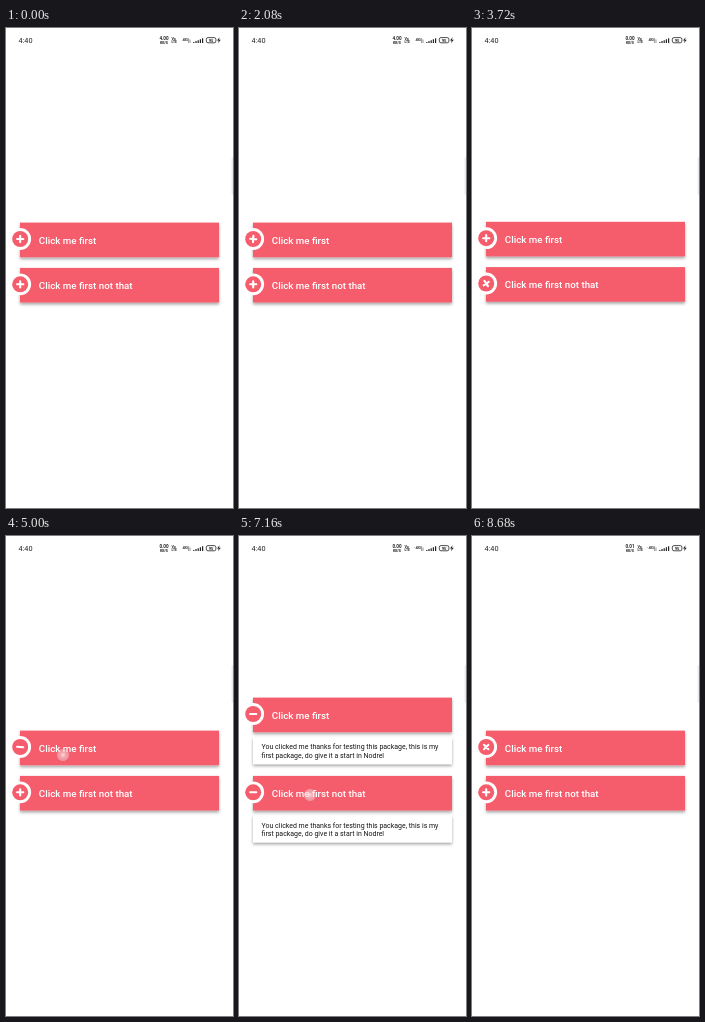
An HTML page for the animation above (8720 ms loop, 227x480 px).

```html
<!DOCTYPE html>
<html lang="en">
<head>
<meta charset="utf-8">
<title>Accordion cards</title>
<style>
html, body { margin: 0; width: 100%; height: 100%; overflow: hidden; background: #fff; }
svg { display: block; width: 100vw; height: 100vh; font-family: Roboto, sans-serif; }
.title { font-weight: 500; font-size: 9.75px; fill: #fff; }
.body { font-size: 6.97px; fill: #151515; }
.tiny { font-weight: 700; font-size: 4.2px; fill: #222; }
</style>
</head>
<body>
<svg viewBox="0 0 227 480">
  <defs>
    <filter id="shade" x="-10%" y="-40%" width="120%" height="190%">
      <feDropShadow dx="0" dy="1.9" stdDeviation="1.5" flood-color="#000" flood-opacity=".36"/>
    </filter>
    <radialGradient id="glow">
      <stop offset="0" stop-color="#fff" stop-opacity=".75"/>
      <stop offset=".45" stop-color="#f6dfe2" stop-opacity=".55"/>
      <stop offset=".9" stop-color="#e8d4d8" stop-opacity=".42"/>
      <stop offset="1" stop-color="#e8d4d8" stop-opacity="0"/>
    </radialGradient>
  </defs>
  <rect width="227" height="480" fill="#fff"/>
  <rect x="225.6" y="129" width="3" height="38" rx="1" fill="#e9e9e9"/>

  <g id="status">
    <text x="12.5" y="15" font-size="7.3" fill="#222">4:40</text>
    <g class="tiny">
      <text id="speed" x="158" y="11.9" text-anchor="middle" font-size="4.6"></text>
      <text x="158" y="15.6" text-anchor="middle" style="font-size:3.6px">KB/S</text>
      <text x="165.5" y="12" style="font-size:3.6px">Vo</text>
      <text x="165.5" y="15.1" style="font-size:3.4px">LTE</text>
      <text x="176.5" y="13.4">4G</text>
      <text id="arrow" x="174.4" y="12.6">·</text>
    </g>
    <path d="M182.6 15V10.2M184 15V11.5" stroke="#555" stroke-width=".6"/>
    <path d="M187.8 15v-1.1M190 15v-1.9M192.2 15v-2.8M194.4 15v-3.7M196.6 15v-4.8" stroke="#222" stroke-width="1.2"/>
    <rect x="200.3" y="9.6" width="9.6" height="5.2" rx="1.7" fill="none" stroke="#222" stroke-width=".8"/>
    <text class="tiny" x="205.1" y="13.8" text-anchor="middle">95</text>
    <path d="M213.6 9.2l-2.6 3.3h1.7l-.7 2.8 2.8-3.5h-1.8z" fill="#222"/>
  </g>

  <g id="cards"></g>
  <circle id="touch" r="6.4" fill="url(#glow)"/>
</svg>
<script>
const LOOP = 8720, OPEN_MS = 490, CLOSE_MS = 390, HOLD = 180;
const SPIN_OPEN = 600, SPIN_CLOSE = 1040;
const TOP = 194.6, HEAD = 34.6, PITCH = 45.3, EXTRA = 33;

// release time, card, opens?, finger x, finger y
const taps = [
  [220, 0, 1, 57, 213],
  [1540, 0, 0, 58, 200],
  [2460, 1, 1, 70, 262],
  [3400, 1, 0, 72, 245],
  [4990, 0, 1, 57, 219],
  [6010, 1, 1, 71.5, 272],
  [7320, 1, 0, 71, 259],
  [7900, 0, 0, 60, 190]
];

const $ = id => document.getElementById(id);
const clamp = v => Math.max(0, Math.min(1, v));
const ease = v => v < .5 ? 4 * v ** 3 : 1 - 4 * (1 - v) ** 3;
const put = (el, attrs) => { for (const k in attrs) el.setAttribute(k, attrs[k]); };

const cardMarkup = (title, i) => `
  <g id="card${i}">
    <clipPath id="clip${i}"><rect id="reveal${i}" y="${HEAD}" width="227"/></clipPath>
    <g clip-path="url(#clip${i})">
      <rect x="14" y="39.7" width="199" height="26.8" fill="#fff" filter="url(#shade)"/>
      <text class="body" x="22.6" y="51.7">You clicked me thanks for testing this package, this is my</text>
      <text class="body" x="22.6" y="60.1">first package, do give it a start in Nodrel</text>
    </g>
    <rect x="14" width="199" height="${HEAD}" fill="#f55d6d" filter="url(#shade)"/>
    <text class="title" x="32.8" y="21.2">${title}</text>
    <circle cx="14.2" cy="16.4" r="10.9" fill="#fff"/>
    <circle cx="14.2" cy="16.4" r="8" fill="#f55d6d"/>
    <path id="glyph${i}" stroke="#fff" stroke-width="2.1" stroke-linecap="round"/>
  </g>`;
$('cards').innerHTML = ['Click me first', 'Click me first not that'].map(cardMarkup).join('');

function cardState(i, t) {
  let state = { p: 0, open: 0, spin: 180 };
  for (const [at, card, open] of taps) {
    if (card !== i || t < at) continue;
    const k = ease(clamp((t - at - 20) / (open ? OPEN_MS : CLOSE_MS)));
    const turn = clamp((t - at) / (open ? SPIN_OPEN : SPIN_CLOSE));
    state = { p: open ? k : 1 - k, open, spin: 180 * turn };
  }
  return state;
}

function drawCard(i, y, { p, open, spin }) {
  put($('card' + i), { transform: `translate(0 ${y})` });
  put($('reveal' + i), { height: 38.5 * p });
  put($('glyph' + i), {
    d: open ? 'M-3.1 0H3.1' : 'M-3.1 0H3.1M0 -3.1V3.1',
    transform: `translate(14.2 16.4) rotate(${spin})`
  });
}

function drawTouch(t) {
  const tap = taps.find(([at]) => t >= at - HOLD && t < at + 60);
  if (!tap) return put($('touch'), { opacity: 0 });
  const [at, , , x, y] = tap;
  const alpha = Math.min(clamp((t - at + HOLD) / 20), clamp((at + 60 - t) / 40));
  put($('touch'), { cx: x, cy: y, opacity: alpha });
}

function draw(t) {
  const a = cardState(0, t), b = cardState(1, t);
  const y = TOP - EXTRA / 2 * (a.p + b.p);
  drawCard(0, y, a);
  drawCard(1, y + PITCH + EXTRA * a.p, b);
  drawTouch(t);
  $('speed').textContent = t < 3200 ? '4.00' : t < 7800 ? '0.00' : '0.01';
  put($('arrow'), { opacity: t > 6600 ? 1 : 0 });
}

const start = performance.now();
function tick() {
  draw((performance.now() - start) % LOOP);
  requestAnimationFrame(tick);
}
draw(0);
requestAnimationFrame(tick);
</script>
</body>
</html>
```
